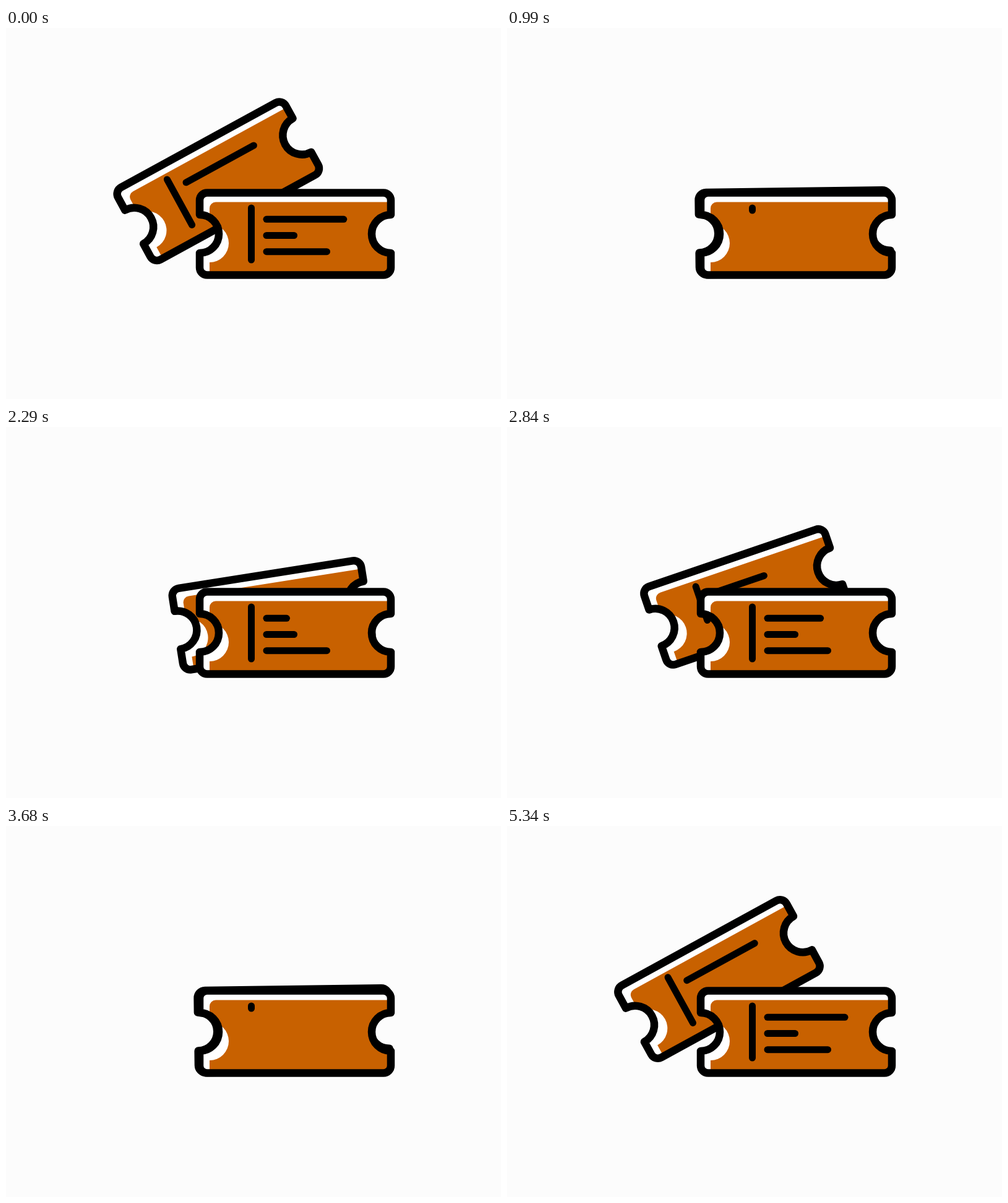
An HTML page with a canvas that plays this animation: 800x600 px, repeating every 5.37 s.

```html
<!DOCTYPE html>
<html>
<head>
<meta charset="utf-8">
<title>Tickets</title>
<style>
  html, body { margin: 0; width: 100%; height: 100%; overflow: hidden; background: #fcfcfc; }
  canvas { display: block; }
</style>
</head>
<body>
<canvas id="stage" width="800" height="600"></canvas>
<script>
const ctx = document.getElementById('stage').getContext('2d');
const LOOP = 5370, CYCLE = 2690, SWING = 2650;
const HOME = { x: 467.5, y: 333 };
const HALF_W = 154.5, HALF_H = 66.5, CORNER = 12, NOTCH = 31;
const SHADE = { x: 16, y: 15 };
const MAX_TILT = 28.75 * Math.PI / 180;
const ORANGE = '#c86100';

// Outline around the origin, with a half-round bite on each short side.
function ticketPath() {
  const p = new Path2D(), w = HALF_W, h = HALF_H;
  p.moveTo(-w + CORNER, -h);
  p.arcTo(w, -h, w, 0, CORNER);
  p.lineTo(w, -NOTCH);
  p.arc(w, 0, NOTCH, -Math.PI / 2, Math.PI / 2, true);
  p.arcTo(w, h, 0, h, CORNER);
  p.arcTo(-w, h, -w, 0, CORNER);
  p.lineTo(-w, NOTCH);
  p.arc(-w, 0, NOTCH, Math.PI / 2, -Math.PI / 2, true);
  p.arcTo(-w, -h, 0, -h, CORNER);
  p.closePath();
  return p;
}

// Orange area: the same left edge, shifted, running past the right side.
function shadePath() {
  const p = new Path2D(), l = -HALF_W + SHADE.x, t = -HALF_H + SHADE.y;
  p.moveTo(200, t);
  p.arcTo(l, t, l, 0, 10);
  p.lineTo(l, SHADE.y - NOTCH);
  p.arc(l, SHADE.y, NOTCH, -Math.PI / 2, Math.PI / 2);
  p.lineTo(l, 100);
  p.lineTo(200, 100);
  p.closePath();
  return p;
}

const outline = ticketPath(), shade = shadePath();

function bar(x, y, dx, dy, part) {
  if (part < 0.03) return;
  ctx.beginPath();
  ctx.moveTo(x, y);
  ctx.lineTo(x + dx * part, y + dy * part);
  ctx.stroke();
}

function ticket(x, y, tilt, drawBars) {
  ctx.save();
  ctx.translate(x, y);
  ctx.rotate(-tilt);
  ctx.fillStyle = '#fff';
  ctx.fill(outline);
  ctx.save();
  ctx.clip(outline);
  ctx.fillStyle = ORANGE;
  ctx.fill(shade);
  ctx.restore();
  ctx.strokeStyle = '#000';
  ctx.lineCap = ctx.lineJoin = 'round';
  ctx.lineWidth = 11;
  drawBars();
  ctx.lineWidth = 12.5;
  ctx.stroke(outline);
  ctx.restore();
}

// How far the rear ticket is fanned out: 1 open, near 0 closed.
const fan = u => 0.006 + 0.994 * Math.exp(-u * (0.0024 + 2.9e-6 * u - 1.3e-9 * u * u));
const shrink = u => Math.exp(-u * (0.0016 + 6e-6 * u));

function retract(u, start, span) {
  const k = Math.min(1, Math.max(0, (u - start) / span));
  return (1 - k) ** 2;
}

function draw(time) {
  const p = time % LOOP % CYCLE;
  const u = Math.max(0, Math.min(p, SWING - p));
  const s = fan(u), q = 1 - s, long = shrink(u);

  ctx.fillStyle = '#fcfcfc';
  ctx.fillRect(0, 0, 800, 600);

  ticket(HOME.x - 125 * s + 16 * s * q ** 3, HOME.y - 85.5 * s - 9 * s * q, MAX_TILT * s, () => {
    bar(-71, -42, 0, 84, long);
    bar(-46.5, -23, 125, 0, long);
  });
  ticket(HOME.x, HOME.y, 0, () => {
    bar(-71, -42, 0, 84, retract(u, 600, 500));
    bar(-46.5, -23.7, 125, 0, long);
    bar(-46.5, 2.5, 44.5, 0, retract(u, 370, 369));
    bar(-46.5, 28.7, 97.5, 0, retract(u, 420, 411));
  });
}

const begin = performance.now();
function tick() {
  draw(performance.now() - begin);
  requestAnimationFrame(tick);
}
tick();
</script>
</body>
</html>
```
